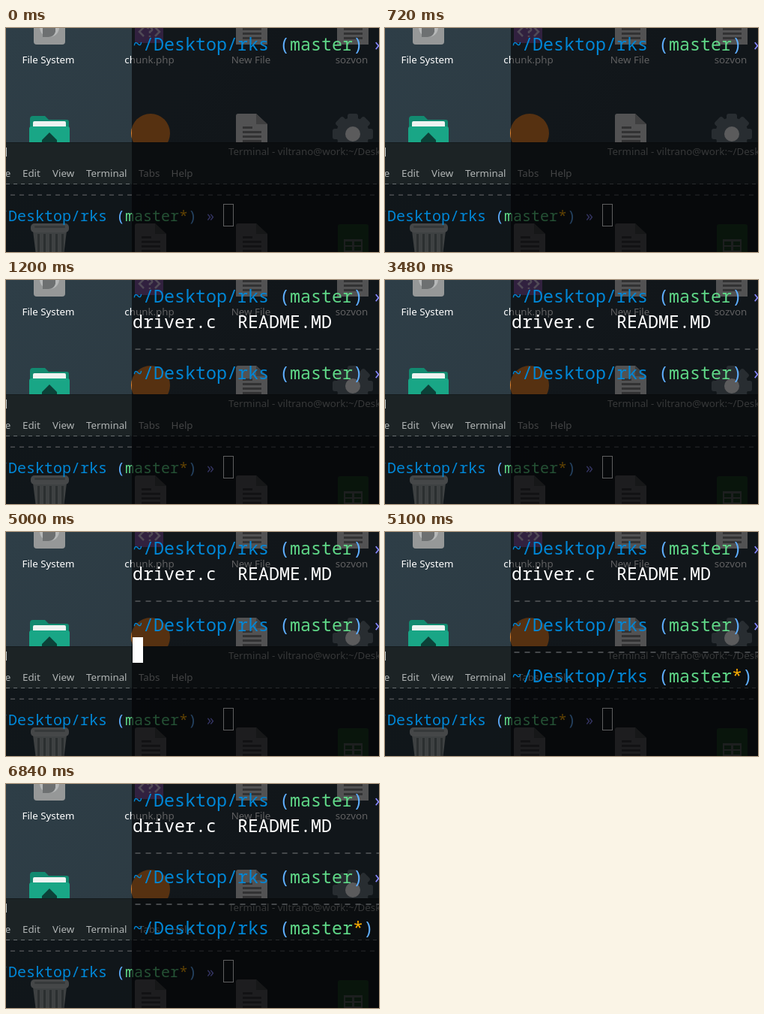
An HTML page with a canvas for the animation above (8 s loop, 498 by 298 pixels).

```html
<!DOCTYPE html>
<html lang="en">
<head>
<meta charset="utf-8">
<title>Terminal</title>
<style>
  html, body { margin: 0; width: 100%; height: 100%; overflow: hidden; background: #11181c; }
  canvas { display: block; width: 498px; height: 298px; }
</style>
</head>
<body>
<canvas id="stage" width="498" height="298"></canvas>
<script>
const W = 498, H = 298, LOOP = 8000;
const ctx = document.getElementById('stage').getContext('2d');
const SANS = '13.33px "Noto Sans", "Open Sans", sans-serif';
const MONO = '"Noto Sans Mono", "DejaVu Sans Mono", monospace';
const BLUE = '#0087d7', SKY = '#5fafff', GREEN = '#5fd787',
      AMBER = '#ffaf00', VIOLET = '#8787ff', DASH = '#484b4e';

function rect(x, y, w, h, color, r = 0) {
  ctx.fillStyle = color;
  ctx.beginPath();
  ctx.roundRect(x, y, w, h, r);
  ctx.fill();
}

function disc(x, y, r, color) {
  ctx.fillStyle = color;
  ctx.beginPath();
  ctx.arc(x, y, r, 0, Math.PI * 2);
  ctx.fill();
}

function shape(path, color) {
  ctx.fillStyle = color;
  ctx.fill(new Path2D(path));
}

function label(str, x, y, color, align = 'left') {
  ctx.font = SANS;
  ctx.textAlign = align;
  ctx.fillStyle = color;
  ctx.fillText(str, x, y);
}

// Monospaced text on a fixed cell grid; parts are [text, color] pairs.
function mono(parts, x, y, cell) {
  ctx.font = `${cell / 0.6}px ${MONO}`;
  ctx.textAlign = 'left';
  for (const [str, color] of parts) {
    ctx.fillStyle = color;
    ctx.fillText(str, x, y);
    x += str.length * cell;
  }
}

const prompt = (mark = '') => [
  ['~/Desktop/rks ', BLUE], ['(', SKY], ['master', GREEN],
  [mark, AMBER], [')', SKY], [' »', VIOLET]
];
const rule = [['-'.repeat(46), DASH]];

function page(x, y) {
  shape(`M${x + 3} ${y}h24l15 14v31h-42v-42q0-3 3-3z`, '#dcdcdc');
  shape(`M${x + 27} ${y}l15 14h-15z`, '#a8a8a8');
  for (let i = 0; i < 4; i++) rect(x + 9, y + 17 + i * 6, i ? 25 : 13, 3, '#858585');
}

function drive() {
  rect(37, -24, 42, 46, '#969898', 4);
  disc(58, -1, 13, '#b6b8b8');
  shape('M49 -2h17v7q-2 7-9 7h-8z', '#6d7071');
}

function script() {
  rect(172, -26, 38, 46, '#8458a6', 3);
  ctx.strokeStyle = '#d8c8e6';
  ctx.lineWidth = 2.5;
  ctx.stroke(new Path2D('M184 -1l-6 6 6 6M199 -1l6 6-6 6M189 1q2-4 5-1t-2 5v2M192 10v2'));
}

function folder() {
  shape('M32 152v-31q0-4 4-4h16l5 5h24q3 0 3 3v27z', '#128a70');
  rect(36, 124, 44, 14, '#eef3f1', 2);
  rect(31, 131, 54, 34, '#19a686', 3);
  shape('M58 139l10 10q1 6-5 6h-10q-6 0-5-6z', '#0c4138');
}

function gear() {
  ctx.save();
  ctx.translate(463, 141);
  for (let i = 0; i < 8; i++) {
    rect(-7, -27, 14, 16, '#6b7880', 3);
    ctx.rotate(Math.PI / 4);
  }
  ctx.restore();
  disc(463, 141, 22, '#6b7880');
  disc(463, 141, 10, '#f4f4f4');
}

function bin() {
  shape('M36 270h45l-4 32h-37z', '#b4b8b8');
  for (let x = 42; x < 78; x += 8) rect(x, 274, 3, 26, '#7d8484');
  rect(33, 260, 51, 12, '#c8cccc', 5);
  rect(38, 263, 41, 3, '#9da3a3', 1);
}

function sheet() {
  rect(443, 261, 41, 46, '#3f9a45', 3);
  rect(451, 281, 25, 20, '#dcefdc');
  for (const x of [453, 465]) for (const y of [284, 291]) rect(x, y, 9, 5, '#3f9a45');
}

function desktop() {
  const sky = ctx.createLinearGradient(0, 0, W, H);
  sky.addColorStop(0, '#2e3e47');
  sky.addColorStop(1, '#2b373e');
  rect(0, 0, W, H, sky);
  drive();
  script();
  page(307, -23);
  page(442, -23);
  folder();
  disc(193, 140, 26, '#e8842a');
  page(307, 114);
  gear();
  bin();
  page(172, 260);
  page(307, 260);
  sheet();
  label('File System', 56.5, 47, '#fff', 'center');
  label('chunk.php', 191.5, 47, '#fff', 'center');
  label('New File', 327, 47, '#fff', 'center');
  label('sozvon', 461.5, 47, '#fff', 'center');
}

function backWindow() {
  rect(0, 152, W, 56, '#1c2325');
  rect(0, 152, W, 1, '#151b1d');
  rect(0, 208, W, 90, 'rgba(2,4,5,.66)');
  rect(0, 159, 1, 12, '#c4c8c8');
  label('Terminal - viltrano@work:~/Desktop/rks', 297, 169, '#8f9494');
  const menu = [['File', -15], ['Edit', 22], ['View', 62], ['Terminal', 107], ['Tabs', 177], ['Help', 220.5]];
  for (const [name, x] of menu) label(name, x, 198, '#b0b4b4');
  ctx.strokeStyle = '#6a7072';
  ctx.lineWidth = 1;
  ctx.setLineDash([5, 5]);
  ctx.beginPath();
  ctx.moveTo(0, 207.5);
  ctx.lineTo(W, 207.5);
  ctx.stroke();
  ctx.setLineDash([]);
  mono(rule, -21, 228, 12);
  mono(prompt('*'), -21, 257, 12);
  ctx.strokeStyle = '#fff';
  ctx.strokeRect(290.5, 234.5, 13, 29);
}

function frontWindow(t) {
  rect(168, 0, W - 168, H, 'rgba(2,3,4,.63)');
  const line = (parts, y) => mono(parts, 169, y, 14);
  line(prompt(), 30);
  if (t < 1200) return;
  line([['driver.c  README.MD', '#fff']], 64);
  line(rule, 98);
  line(prompt(), 132);
  if (t < 5000) return;
  if (t < 5100) {
    rect(169, 140, 14, 34, '#fff');
  } else {
    line(rule, 166);
    line(prompt('*'), 200);
  }
}

const start = performance.now();
function draw() {
  const t = (performance.now() - start) % LOOP;
  desktop();
  backWindow();
  frontWindow(t);
  requestAnimationFrame(draw);
}
draw();
</script>
</body>
</html>
```
